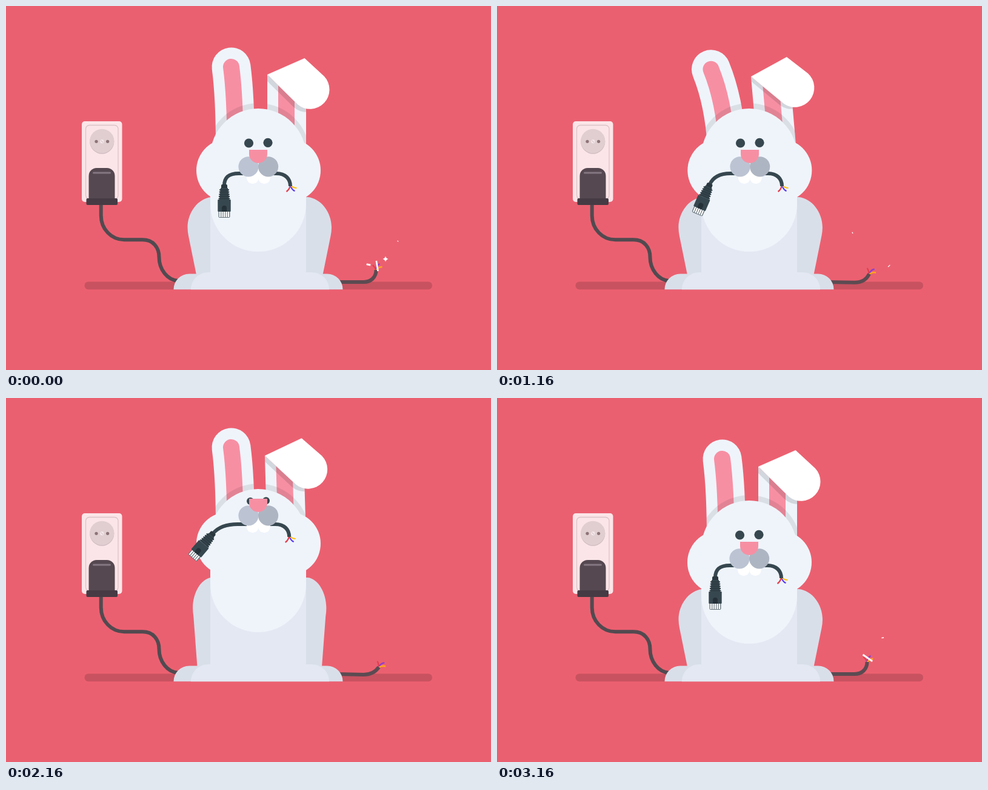
Write an HTML page with a canvas that moves like this. It is 800 by 600 pixels and loops after 3.2 s.

```html
<!DOCTYPE html>
<html>
<head>
<meta charset="utf-8">
<style>
  html, body { margin: 0; height: 100%; overflow: hidden; background: #eb6070; }
  canvas { display: block; }
</style>
</head>
<body>
<canvas id="stage" width="800" height="600"></canvas>
<script>
const c = document.getElementById('stage').getContext('2d');
const LOOP = 3200, SPARK_LOOP = 800;
const FUR = '#eff4fb', SHADE = '#d9dfe9', BELLY = '#e3e8f2', PINK = '#f78fa3';
const DARK = '#37474f', CORD = '#524a50', SHADOW = 'rgba(0,0,0,.085)';
const RED = '#e53e4c', YELLOW = '#ffc31c';
const rad = Math.PI / 180;

// Eased progress from 0 to 1 between two times.
function ease(t, start, end) {
  const x = Math.min(1, Math.max(0, (t - start) / (end - start)));
  return x * x * (3 - 2 * x);
}

// The whole pose at one time: look left, look right, come back, then nod up and down.
function pose(t) {
  const e = (start, end) => ease(t, start, end);
  return {
    turn: -42 * e(0, 380) + 64.5 * e(540, 740) - 22.5 * e(900, 1200),
    lift: e(1680, 2010) - e(2420, 2880),
    bend: e(160, 760) - e(1160, 1600),
    tilt: 5 * (e(440, 1100) - e(1440, 2620)),
    swing: 66 * e(100, 760) - 60 * e(760, 1380) + 36 * e(1700, 2110) - 42 * e(2110, 2530),
    droop: .9 * e(240, 760) - .4 * e(760, 1160) + .3 * e(1920, 2400) - .8 * e(2400, 3160)
  };
}

function fill(path, color) {
  c.fillStyle = color;
  c.fill(new Path2D(path));
}
function stroke(path, color, width, cap = 'butt') {
  c.strokeStyle = color;
  c.lineWidth = width;
  c.lineCap = cap;
  c.stroke(new Path2D(path));
}
function disc(x, y, r, color) {
  c.beginPath();
  c.arc(x, y, r, 0, 7);
  c.fillStyle = color;
  c.fill();
}
function box(x, y, w, h, r, color) {
  c.beginPath();
  c.roundRect(x, y, w, h, r);
  c.fillStyle = color;
  c.fill();
}
function at(x, y, angle, draw) {
  c.save();
  c.translate(x, y);
  c.rotate(angle * rad);
  draw();
  c.restore();
}

function socket() {
  box(125, 190, 66.5, 133, 5, '#fbe5e8');
  c.beginPath();
  c.roundRect(131.5, 196.5, 53.5, 121.5, 6);
  c.strokeStyle = '#dcc3c8';
  c.lineWidth = 1.3;
  c.stroke();
  disc(158.3, 223.7, 20, '#c9b5b9');
  disc(158.3, 222.7, 20, '#e0ced1');
  disc(149, 223.3, 2.6, '#8d7478');
  disc(167.6, 223.3, 2.6, '#8d7478');
  disc(158.3, 223.3, 3.2, '#f3e6e8');
  stroke('M156.5 221.5L160 225', '#cdbabd', 1);
  stroke('M156.7 326V345C156.7 368 174 385.3 195 385.3H225C243 385.3 252.5 398 252.5 414C252.5 434 266 452 284 453', CORD, 6);
  box(136.5, 267, 43, 54, [13, 13, 0, 0], '#554850');
  box(143, 273.5, 30, 3, 1.5, '#857781');
  box(132.5, 317, 51.5, 11, 2, '#463b44');
}

function floorCable(droop) {
  const x = 610.5 + 7 * droop, y = 435 + 13 * droop, floor = 455 + 1.5 * droop;
  at(x, y, 33 * droop, () => {
    stroke('M0 1Q-2 -5 -6 -8', RED, 2.2);
    stroke('M0 1Q0 -7 6 -10', '#8740d6', 2.4);
    stroke('M0 1Q4 -5 10 -5', '#ffa91c', 2.4);
  });
  stroke(`M545 455L590 ${floor}C602 ${floor} ${x - 8 * droop} ${y + 12 - 7 * droop} ${x} ${y}`, '#5c4b52', 6);
}

// A spinning streak that speeds up and shrinks as it flies off.
function spark(t, start, life, x, y, dx, dy, size) {
  const age = (t - start + SPARK_LOOP) % SPARK_LOOP, k = age / life;
  if (k > 1) return;
  const fade = (1 - k) ** 1.5, half = 1 + size * fade / 2;
  at(x + dx * k * k, y + dy * k ** 1.2, 1.15 * age - 12,
    () => stroke(`M${-half} 0H${half}`, '#fff', 1.1 + 1.9 * fade));
}

function sparks(t) {
  spark(t, 720, 600, 611, 428.5, 66, 0, 19);
  spark(t, 780, 500, 598, 428, -20, -75, 5);
  spark(t, 600, 220, 618, 420, 34, -36, 12);
  if (t < 80) at(626, 417, 0, () => fill('M0 -4.5Q1 -1 4.5 0Q1 1 0 4.5Q-1 1 -4.5 0Q-1 -1 0 -4.5', '#fff'));
}

function body(sway, shift, lift) {
  const y = -19 * lift, slim = 1 - .23 * lift;
  const arm = (x, side) => {
    const X = dx => x + sway + side * dx * slim;
    const hand = x + sway * .6 + side * (23 - 1.5 * lift);
    fill(`M${X(-15)} ${315 + y}L${X(-2)} ${315 + y}
      C${X(20)} ${317 + y} ${X(37.5)} ${340 + y} ${X(37.5)} ${365 + y}
      Q${X(37.5)} ${372 + y} ${X(36)} ${379 + y}L${hand} 443H${x - side * 15}Z`, SHADE);
  };
  arm(337, -1);
  arm(499.5, 1);
  box(337 + shift, 312 + y, 158, 150, 0, BELLY);
  box(276.5, 441.5, 279, 25.7, [26, 26, 0, 0], SHADE);
  box(305, 439, 228, 28.2, [28, 28, 0, 0], BELLY);
}

function ears(bend, tilt) {
  const mix = (a, b) => a + (b - a) * bend;
  const left = `M${mix(371.5, 353)} ${mix(100.5, 104.3)}Q${mix(378, 374.5)} ${mix(150, 157)} ${mix(378, 379)} 230`;
  const right = 'M431 113L481 162H495V236H431Z';
  const fold = 'M431 113L492.5 86L525 116A32 32 0 0 1 481 162.3Z';
  const tilted = draw => at(463 - .4 * tilt, 230, -tilt, () => {
    c.translate(-463, -230);
    draw();
  });

  stroke(left, FUR, 64, 'round');
  stroke(left, PINK, 27, 'round');
  tilted(() => {
    fill(right, FUR);
    fill('M449 130L476 156V235H449Z', PINK);
    c.save();
    c.clip(new Path2D(right));
    c.translate(-6, 5 - .5 * tilt);
    fill(fold, 'rgba(0,0,0,.12)');
    c.restore();
  });

  // The head's soft shadow, only where it falls on the ears.
  c.save();
  c.beginPath();
  c.arc(416, 245, 85, 0, 7);
  c.clip();
  stroke(left, SHADOW, 64, 'round');
  tilted(() => fill(right, SHADOW));
  c.restore();
  tilted(() => fill(fold, '#fff'));
}

function jack() {
  box(-9.5, 43, 19, 12, 2, '#66737a');
  for (let i = 0; i < 5; i++) box(-8.2 + i * 3.5, 45, 2.3, 9, 0, '#fff');
  box(-5, 0, 10, 8, 2, '#2b383f');
  fill('M-6 6H6L8 25H-8Z', DARK);
  for (let i = 0; i < 5; i++) box(-8 - i * .4, 8 + i * 3.6, 16 + i * .8, 2.2, 1, '#2e3c43');
  box(-10.7, 25, 21.4, 20, 1, DARK);
  box(-4, 35, 8, 10, [4, 4, 0, 0], '#253138');
}

function chewedCable(swing) {
  const s = Math.sin(swing * rad), k = Math.cos(swing * rad);
  const x = 360 - 24 * s, y = 294 - 18 * (1 - k);
  stroke(`M410 276H384C368 276 ${x + 12 * s} ${y - 12 * k} ${x - 2 * s} ${y + 2 * k}`, DARK, 6);
  at(x, y, swing, jack);
  at(469, 296, 0, () => {
    stroke('M0 -1Q-1 6 -6.5 10', RED, 2.2);
    stroke('M0 -1Q2 7 7.5 9', '#5738f2', 2.2);
    stroke('M0 -1Q4 4 10.5 4', YELLOW, 2.2);
  });
  stroke('M420 276H446C461 276 469 285 469 297', DARK, 6);
}

function face(lift, swing) {
  const eyeY = -56 * lift, r = 7.6 - 1.6 * lift;
  disc(400.5 + 2.5 * lift, 226 + eyeY, r, DARK);
  disc(432 - 3 * lift, 225.3 + eyeY, r, DARK);
  at(-1.8 * lift, -68 * lift, 0, () => chewedCable(swing));
  at(0, -71 * lift, 0, () => {
    box(397, 262, 19.6, 31, [0, 0, 9.5, 9.5], '#fff');
    box(416.2, 262, 19.6, 31, [0, 0, 9.5, 9.5], '#fff');
    disc(400, 264.8, 16.6, '#bcc4d3');
    disc(432.6, 264.8, 16.6, '#aeb5c2');
    box(401, 237, 30, 22, [0, 0, 15, 15], PINK);
  });
}

function draw(t) {
  const { turn, lift, bend, tilt, swing, droop } = pose(t);
  const cheek = turn * (turn < 0 ? .19 : .34), cheekY = 271 - 31 * lift;
  const headX = Math.min(0, turn) * .12, headY = -19 * lift;

  c.fillStyle = '#eb6070';
  c.fillRect(0, 0, 800, 600);
  box(129.5, 454.5, 573.5, 12.7, 6.2, '#c85260');
  socket();
  floorCable(droop);
  sparks(t);

  body(-cheek * .31, headX - Math.max(0, turn) * .045, lift);
  at(headX * 1.3, headY, 0, () => ears(bend, tilt));
  disc(366 + cheek, cheekY, 52, FUR);
  disc(467 + cheek, cheekY, 52, FUR);
  box(337 + headX, 169 + headY, 158, 236, 79, FUR);
  at(turn, 0, 0, () => face(lift, swing));
}

const begin = performance.now();
function tick() {
  draw((performance.now() - begin) % LOOP);
  requestAnimationFrame(tick);
}
tick();
</script>
</body>
</html>
```
